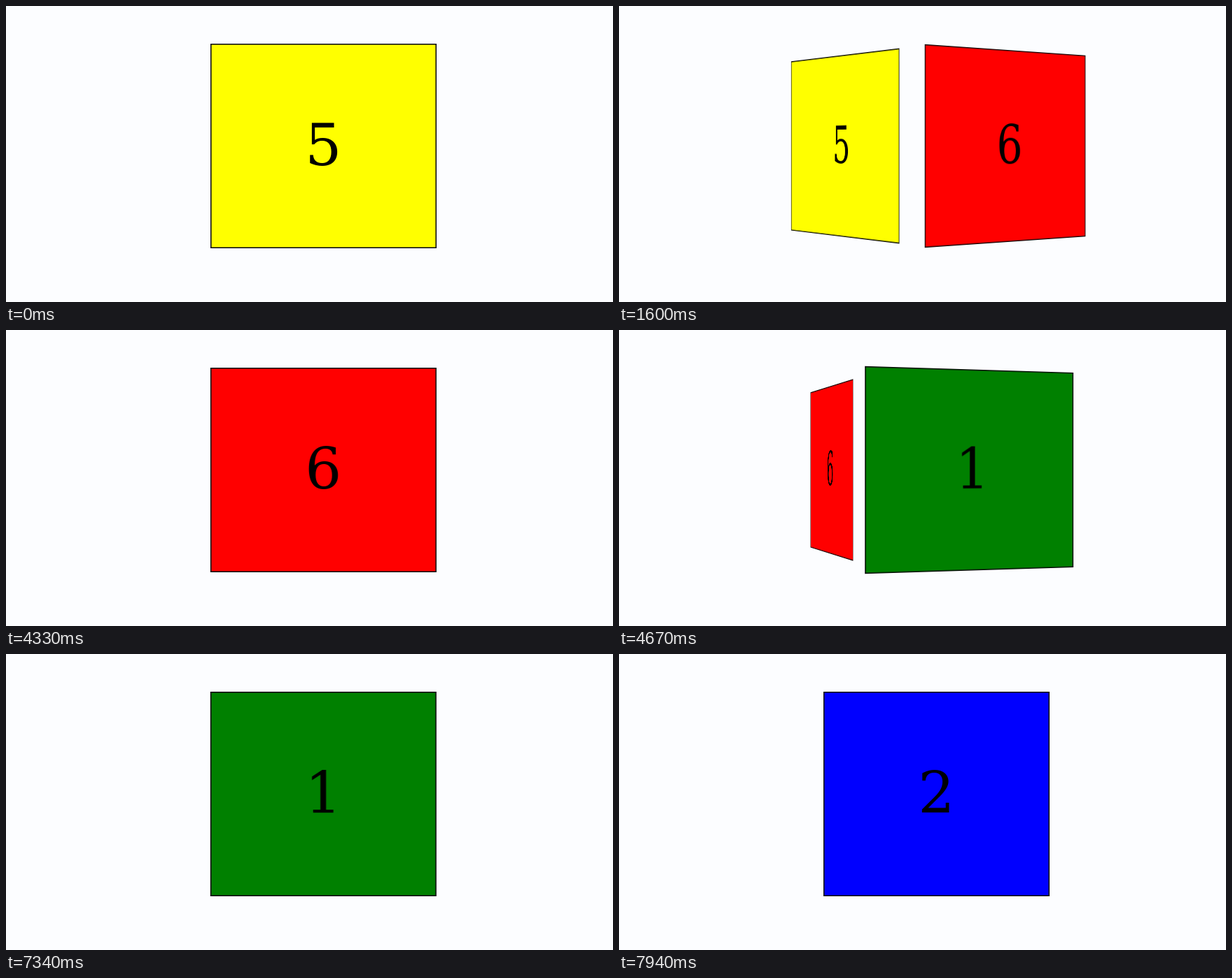
These frames come from a looping animation (867x424 px, 8 s). An HTML page:

```html
<!DOCTYPE html>
<html lang="en">
<head>
<meta charset="utf-8">
<title>Turning cube</title>
<style>
  html, body { margin: 0; width: 100%; height: 100%; overflow: hidden; background: #fcfdff; }
  .face {
    position: absolute; left: 292px; top: 54px; width: 322.6px; height: 292.6px;
    box-shadow: inset 0 0 0 1.5px #000;
    font: 82px/292.6px "DejaVu Serif", serif; text-align: center; color: #000;
  }
</style>
</head>
<body>
<script>
const LOOP = 8000, FIRST = 1312, PERIOD = 3005, TURN = 612;
const sides = [[5, '#ff0'], [6, '#f00'], [1, '#008000'], [2, '#00f']];

const faces = sides.map(([label, color]) => {
  const el = document.createElement('div');
  el.className = 'face';
  el.textContent = label;
  el.style.background = color;
  document.body.append(el);
  return el;
});

// cubic-bezier(.56, 0, .28, 1), solved by bisection
function ease(u) {
  if (u <= 0) return 0;
  if (u >= 1) return 1;
  let lo = 0, hi = 1, s;
  for (let i = 0; i < 24; i++) {
    s = (lo + hi) / 2;
    const x = 3 * s * (1 - s) ** 2 * .56 + 3 * s * s * (1 - s) * .28 + s ** 3;
    if (x < u) lo = s; else hi = s;
  }
  return s * s * (3 - 2 * s);
}

function place(el, angle) {
  const visible = Math.abs(angle) < 84;
  el.style.display = visible ? 'block' : 'none';
  if (!visible) return;
  const a = angle * Math.PI / 180, cos = Math.cos(a), sin = Math.sin(a), m = Math.abs(sin);
  const x = sin * (128 + 132 * m - 64 * m * m);
  const depth = 1 + .325 * (1 - cos);
  const slope = .000634 * sin;
  const matrix = [cos, 0, 0, slope, 0, 1, 0, 0, 0, 0, 1, 0, x, 0, 0, depth];
  el.style.transform = `matrix3d(${matrix.map(v => v.toFixed(7))})`;
}

function draw(now) {
  const t = now % LOOP;
  let turned = 0;
  for (let i = 0; i < 3; i++) turned += ease((t - FIRST - i * PERIOD) / TURN);
  faces.forEach((el, i) => place(el, 90 * (i - turned)));
  requestAnimationFrame(draw);
}

draw(0);
</script>
</body>
</html>
```
